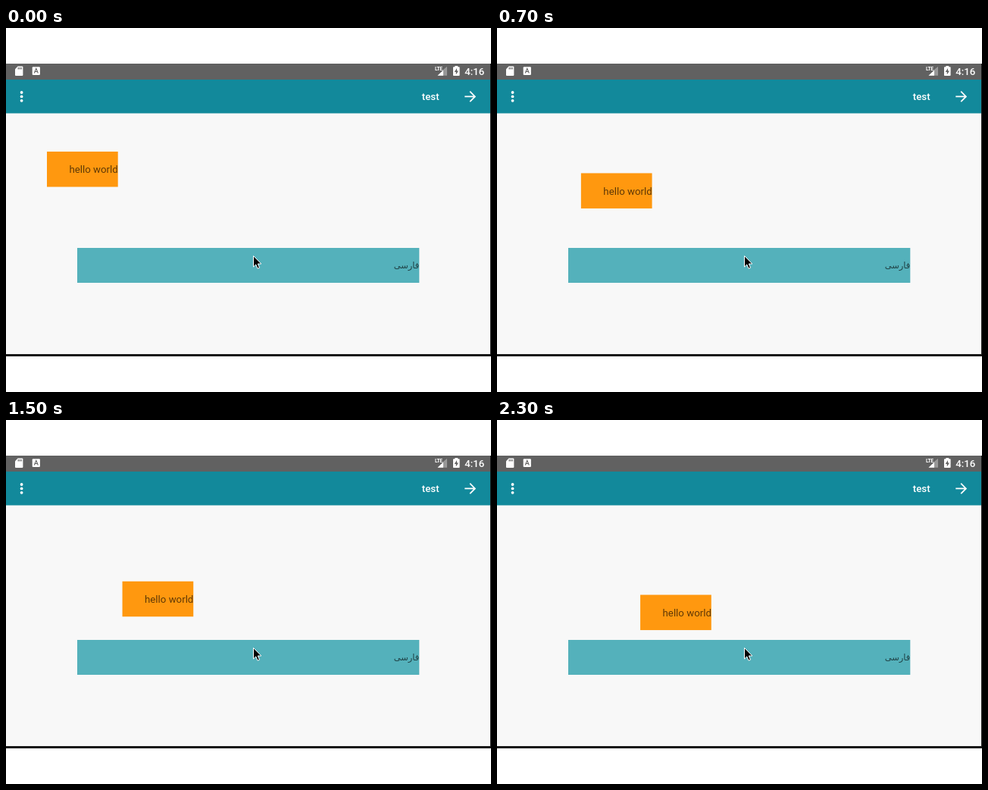
Animation of 640x480 px, one loop 2400 ms. Source, as an HTML page:

```html
<!DOCTYPE html>
<html lang="en">
<head>
<meta charset="utf-8">
<title>Moving label</title>
<style>
  @property --step { syntax: "<number>"; inherits: false; initial-value: 0; }

  html, body { margin: 0; width: 100%; height: 100%; overflow: hidden; background: #fff; }
  svg { display: block; width: 640px; height: 480px; }
  text { font-family: Roboto, "Noto Sans", sans-serif; font-size: 13.25px; }
  .light { fill: #fff; font-weight: 500; }
  .dark { fill: #000; fill-opacity: .63; }
  .end { text-anchor: end; }
  .persian { font-family: "DejaVu Sans", sans-serif; font-size: 11.4px; }

  .label {
    transform: translate(calc(var(--step) * 7.11px), calc(var(--step) * 3.555px));
    animation: walk 2400ms step-end infinite;
  }
  /* Uneven ticks: each step is a hard jump down and right */
  @keyframes walk {
    0% { --step: 0; }
    4.16% { --step: 1; }
    8.33% { --step: 3; }
    12.49% { --step: 4; }
    16.66% { --step: 5; }
    20.83% { --step: 6; }
    24.99% { --step: 7; }
    29.16% { --step: 8; }
    33.33% { --step: 9; }
    41.66% { --step: 10; }
    45.83% { --step: 12; }
    49.99% { --step: 13; }
    58.33% { --step: 14; }
    66.66% { --step: 15; }
    70.83% { --step: 16; }
    74.99% { --step: 17; }
    79.16% { --step: 18; }
    91.66%, 100% { --step: 19; }
  }
</style>
</head>
<body>
<svg viewBox="0 0 640 480">
  <rect width="640" height="480" fill="#fff"/>
  <rect y="47" width="640" height="386" fill="#161616"/>
  <rect y="47" width="639" height="383" fill="#f8f8f8"/>
  <rect y="47" width="639" height="21" fill="#616161"/>
  <rect y="68" width="639" height="44.5" fill="#12899b"/>

  <!-- Status bar: memory card, keyboard, signal, battery, clock -->
  <path fill="#fff" d="M15.6 50.5H21.3Q22.4 50.5 22.4 51.6V62Q22.4 63 21.3 63H13Q12 63 12 62V54.2Z"/>
  <path stroke="#616161" stroke-width="1.1" d="M16.2 52v2.5M18.2 52v2.5M20.2 52v2.5"/>
  <rect x="34.7" y="51.3" width="10.2" height="10.7" rx="1" fill="#fff"/>
  <path fill="none" stroke="#616161" stroke-width="1.1" d="M37.3 59.5L39.8 53.4L42.3 59.5M38.2 57.5h3.2"/>
  <text class="light" x="566" y="56.2" style="font-size:6.6px;font-weight:700;letter-spacing:-.35px">LTE</text>
  <path fill="#fff" fill-opacity=".35" d="M582 50.7V62.8H569.5L576 56.7V55.8Z"/>
  <path fill="#fff" d="M569.5 62.8L577 55.4V62.8Z"/>
  <path fill="#fff" d="M592.4 51.2V50H596.2V51.2H597.8Q598.6 51.2 598.6 52V62.2Q598.6 63 597.8 63H590.8Q590 63 590 62.2V52Q590 51.2 590.8 51.2Z"/>
  <path fill="#616161" d="M595 53L591.7 58H593.8V61.6L597 56.5H595Z"/>
  <text class="light" x="605.3" y="62">4:16</text>

  <!-- Toolbar -->
  <g fill="#fff">
    <circle cx="20.6" cy="85" r="1.9"/>
    <circle cx="20.6" cy="90.4" r="1.9"/>
    <circle cx="20.6" cy="95.8" r="1.9"/>
  </g>
  <text class="light" x="548.8" y="95">test</text>
  <path fill="none" stroke="#fff" stroke-width="1.75" d="M605.3 90.4H619M612.2 83.7L618.9 90.4L612.2 97.1"/>

  <rect x="94" y="290" width="451.3" height="46" fill="#54b1bb"/>
  <text class="dark end persian" x="545.3" y="317" lang="fa">فارسی</text>

  <g class="label">
    <rect x="54" y="163" width="93.7" height="46.5" fill="#ff980f"/>
    <text class="dark end" x="147.8" y="191.3">hello world</text>
  </g>

  <path fill="#000" stroke="#fff" stroke-width="1" stroke-linejoin="round"
    d="M326.5 300.5V315L329.8 311.9L332 317.2L334.5 316.2L332.3 311H336.8Z"/>
</svg>
</body>
</html>
```
